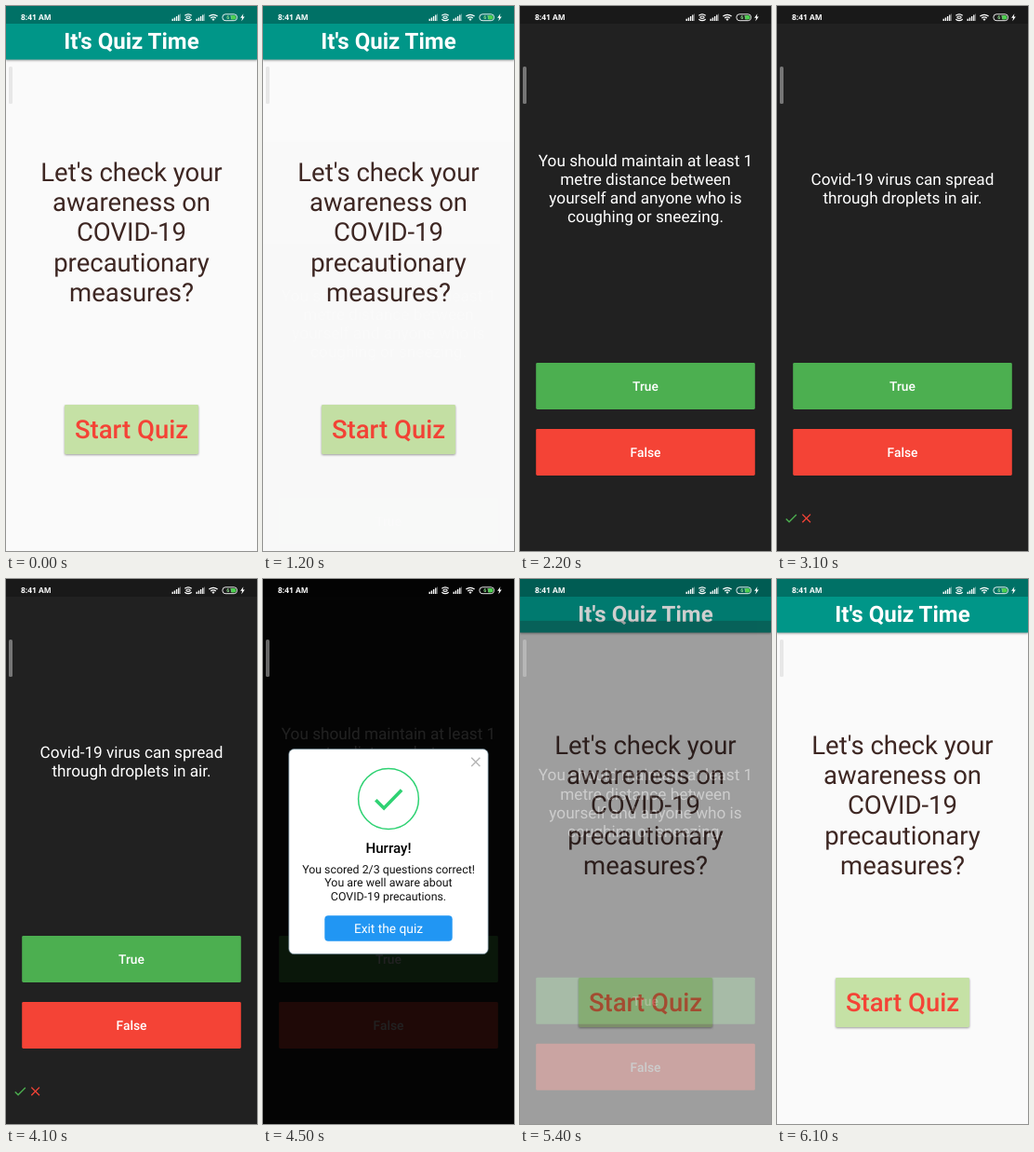
Animation of 270 by 585 pixels, one loop 6.8 s. Source, as an HTML page:

```html
<!DOCTYPE html>
<html lang="en">
<head>
<meta charset="utf-8">
<title>Quiz app</title>
<style>
  html, body { margin: 0; height: 100%; overflow: hidden; background: #fafafa; }
  svg { display: block; width: 100vw; height: 100vh; }
  text { font-family: Roboto, sans-serif; text-anchor: middle; text-rendering: geometricPrecision; }
  .medium { font-weight: 500; }
  .raised { filter: drop-shadow(0 1.6px 1.3px rgba(0, 0, 0, .38)); }
  #clock { font: bold 8.4px "Open Sans", "Noto Sans", sans-serif; text-anchor: start; }
</style>
</head>
<body>
<svg viewBox="0 0 270 585">
  <g id="home">
    <rect width="270" height="585" fill="#fafafa"/>
    <rect class="raised" width="270" height="57.5" fill="#009688"/>
    <text x="135" y="46" font-size="24.06" font-weight="700" fill="#fff">It's Quiz Time</text>
    <text id="intro" font-size="27.5" fill="#3e2723"></text>
    <rect class="raised" x="63" y="428" width="144" height="53" rx="1.4" fill="#c5e1a5"/>
    <text class="medium" x="135" y="463.5" font-size="27.5" fill="#f44336">Start Quiz</text>
  </g>

  <g id="quiz">
    <rect width="270" height="585" fill="#212121"/>
    <text id="question" font-size="17.19" fill="#fff"></text>
    <rect x="17.2" y="383" width="235.6" height="50" rx="1.4" fill="#4caf50"/>
    <rect x="17.2" y="454" width="235.6" height="50" rx="1.4" fill="#f44336"/>
    <g class="medium" font-size="13.75" fill="#fff">
      <text x="135" y="413.2">True</text>
      <text x="135" y="484.2">False</text>
    </g>
    <path id="right" transform="translate(6.9 541.7) scale(.6875)" fill="#4caf50"
      d="M9 16.17 4.83 12 3.41 13.41 9 19 21 7 19.59 5.59z"/>
    <path id="wrong" transform="translate(23.4 541.7) scale(.6875)" fill="none" stroke="#f44336" stroke-width="2"
      d="M5.7 5.7 18.3 18.3M18.3 5.7 5.7 18.3"/>
  </g>

  <rect id="shade" width="270" height="585"/>

  <g id="dialog">
    <rect x="27.8" y="182.6" width="214.4" height="220" rx="5.5" fill="#fff" stroke="#607d8b" stroke-width=".7"/>
    <path d="M224.2 191.7l9.2 9.2m0-9.2l-9.2 9.2" stroke="#b5b5b5" stroke-width="1.4"/>
    <g fill="none" stroke="#2fd273">
      <circle cx="135" cy="236" r="32.4" stroke-width="1.5"/>
      <path d="M121.3 237.2l8.8 8.8 19-19.6" stroke-width="3.6"/>
    </g>
    <text class="medium" x="135" y="293.5" font-size="15.13">Hurray!</text>
    <text id="result" font-size="12.375" fill="#111"></text>
    <rect x="66.3" y="361.3" width="137.4" height="27.5" rx="4" fill="#2196f3"/>
    <text x="135" y="380" font-size="13.75" fill="#fff">Exit the quiz</text>
  </g>

  <rect width="270" height="19" opacity=".25"/>
  <rect x="3" y="65" width="4" height="40" rx="1.5" fill="#d4d4d4" opacity=".48"/>

  <g id="status" fill="#fff">
    <text id="clock" x="16" y="15">8:41 AM</text>
    <path id="bars" d="M178.5 13.8h1.4V16h-1.4zM180.7 12.4h1.4V16h-1.4zM182.9 11h1.4v5h-1.4zM185.1 9.6h1.4V16h-1.4z"/>
    <path d="M187.3 8.5h.7V16h-.7z" opacity=".5"/>
    <use href="#bars" x="26"/>
    <path d="M213.3 8.5h.7V16h-.7z" opacity=".5"/>
    <g fill="none" stroke="#fff" stroke-width="1.1">
      <path d="M192.3 10.3q3.7-2.8 7.4 0M192.3 14.2q3.7 2.8 7.4 0"/>
      <ellipse cx="196" cy="12.2" rx="2.2" ry="1.2"/>
      <path d="M218.4 11.1q4.6-3.6 9.2 0M220.2 13q2.8-2.2 5.6 0" stroke-width="1.3"/>
      <rect x="232.9" y="8.8" width="15.6" height="6.9" rx="3.2" stroke-width=".9"/>
    </g>
    <path d="M221.4 14.1q1.6-1.2 3.2 0L223 16z"/>
    <path d="M242.4 10.1h2.9a2.2 2.2 0 0 1 0 4.4h-2.9z" fill="#4cd14f"/>
    <text x="240.4" y="14.2" font-size="5.4" font-weight="700" fill="#8ee08f">61</text>
    <path d="M255.4 8.3l-3.3 4.4h2l-.8 3.6 3.5-4.7h-2.1z"/>
  </g>
</svg>
<script>
const LOOP = 6800, STEP = 100;
const ENTER = 1184, SECOND = 2500, THIRD = 3100, FINISH = 4160, EXIT = 5233;
const questions = [
  ["You should maintain at least 1", "metre distance between", "yourself and anyone who is", "coughing or sneezing."],
  ["Wearing a face mask is useful", "to protect yourself from the", "Covid-19 virus."],
  ["Covid-19 virus can spread", "through droplets in air."]
];

const el = id => document.getElementById(id);
const clamp = v => Math.max(0, Math.min(1, v));

// Centred lines of text around the middle height.
function setLines(id, lines, middle, leading, ascent) {
  const first = middle - lines.length * leading / 2 + ascent;
  el(id).innerHTML = lines.map((line, i) =>
    `<tspan x="135" y="${first + i * leading}">${line}</tspan>`).join("");
}

function bezier(x1, y1, x2, y2) {
  const at = (a, b, u) => 3 * (1 - u) ** 2 * u * a + 3 * (1 - u) * u * u * b + u ** 3;
  return x => {
    let lo = 0, hi = 1;
    for (let i = 0; i < 24; i++) {
      const mid = (lo + hi) / 2;
      if (at(x1, x2, mid) < x) lo = mid; else hi = mid;
    }
    return at(y1, y2, (lo + hi) / 2);
  };
}
const fastOutSlowIn = bezier(.4, 0, .2, 1);
const easeIn = bezier(.42, 0, 1, 1);
const ease = bezier(.25, .1, .25, 1);

const show = (id, on) => el(id).setAttribute("visibility", on ? "inherit" : "hidden");
const moveY = (id, y) => el(id).setAttribute("transform", `translate(0 ${y})`);

// Progress of something that opens and later closes again.
const openness = (t, from, to, length) =>
  Math.min(clamp((t - from) / length), 1 - clamp((t - to) / length));

let current = -1;
function draw(t) {
  const page = openness(t, ENTER, EXIT, 300);
  show("quiz", page > 0);
  moveY("quiz", (1 - fastOutSlowIn(page)) * 585 / 4);
  el("quiz").setAttribute("opacity", easeIn(page));

  const index = t < SECOND || t >= FINISH ? 0 : t < THIRD ? 1 : 2;
  if (index !== current) setLines("question", questions[current = index], 196, 20.14, 15.9);
  show("right", index > 0);
  show("wrong", index > 1);

  const popup = openness(t, FINISH, EXIT, 200);
  show("dialog", popup > 0);
  moveY("dialog", (1 - popup) * 585);
  el("shade").setAttribute("opacity", popup > 0 ? .87 * ease(popup) : 0);
}

setLines("intro", ["Let's check your", "awareness on", "COVID-19", "precautionary", "measures?"], 243, 32.25, 25.5);
setLines("result", ["You scored 2/3 questions correct!", "You are well aware about", "COVID-19 precautions."], 326, 14.5, 11.6);

const start = performance.now();
function tick() {
  const t = (performance.now() - start) % LOOP;
  draw(Math.floor(t / STEP) * STEP);
  requestAnimationFrame(tick);
}
tick();
</script>
</body>
</html>
```
